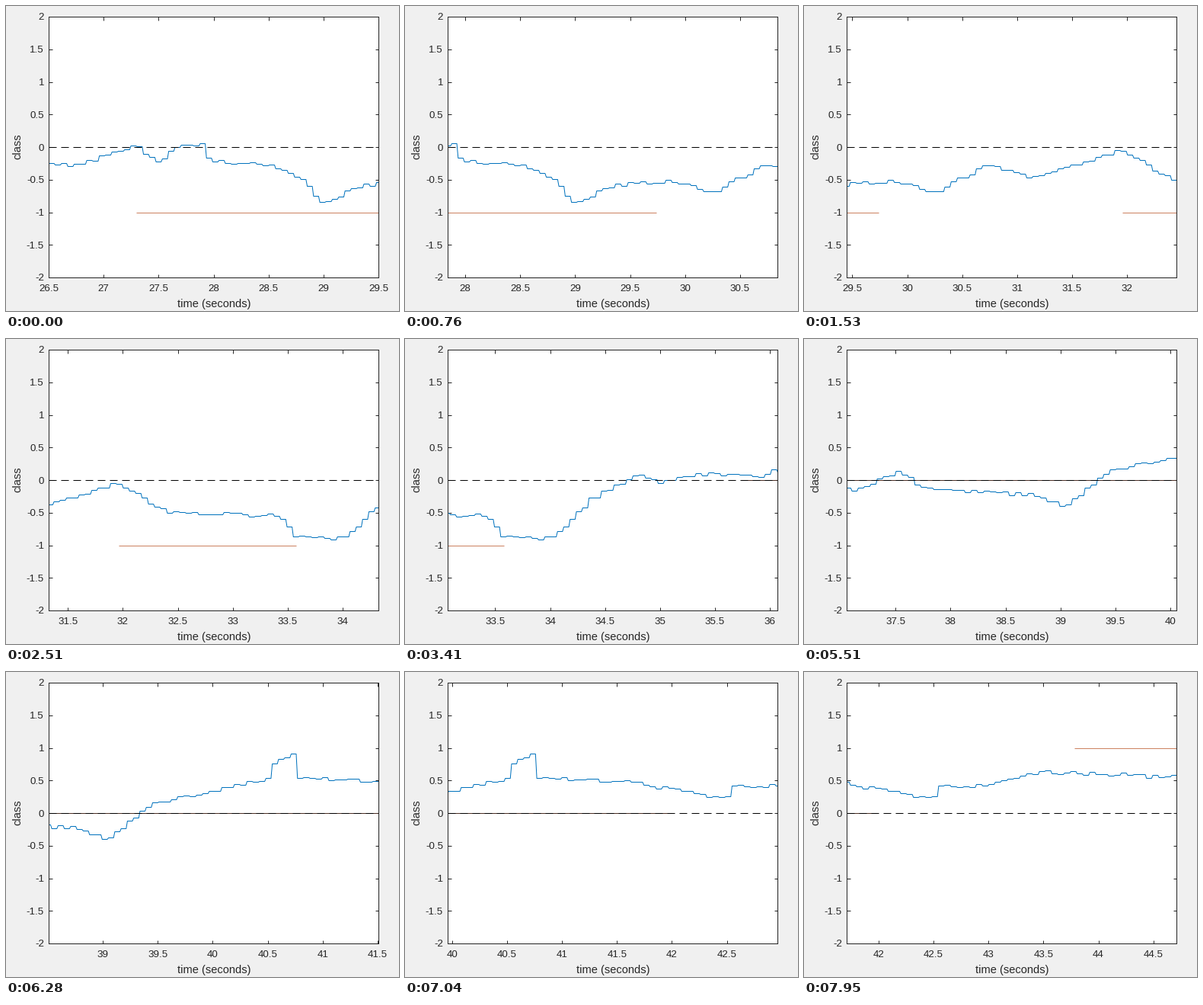
A matplotlib script that plays this animation: 516 by 400 pixels, repeating every 8 s.

```python
import numpy as np
import matplotlib.pyplot as plt
from matplotlib.animation import FuncAnimation
from matplotlib.ticker import MultipleLocator, FormatStrFormatter

W, H, DPI = 516, 400, 100
FRAMES, LOOP = 115, 8000
SPAN = 3.0                          # visible seconds
X0, X1, Y0, Y1 = 56, 489, 14, 356   # axes box in pixels from the top left
SEC = (X1 - X0) / SPAN              # pixels per second
UNIT = (Y1 - Y0) / 4                # pixels per class unit
STEP, RISE = 0.0573, 0.012          # hold time and edge time of one level
START, END = 26.5, 44.8
INK, BLUE, RUST, DARK = "#262626", "#0072BD", "#CC8160", "#4d3026"

# turning points of the signal: time, value
KEYS = [(26.5, -.29), (26.8, -.27), (27.3, .01), (27.5, -.26), (27.65, -.03),
        (27.92, .05), (27.97, -.23), (28.5, -.28), (28.8, -.47),
        (29.0, -.87), (29.4, -.58), (29.9, -.54), (30.26, -.71),
        (30.75, -.27), (31.15, -.48), (31.95, -.05), (32.42, -.5),
        (33.44, -.56), (33.57, -.87), (34.04, -.91), (34.38, -.3),
        (34.8, .06), (35.0, -.05), (35.4, .09), (35.95, .04), (36.05, .18),
        (36.5, -.5), (36.85, -.12), (37.14, -.16), (37.55, .13),
        (37.78, -.15), (38.8, -.24), (39.05, -.42), (39.46, .12),
        (40.5, .52), (40.6, .83), (40.74, .87), (40.79, .53), (41.55, .49),
        (42.5, .2), (42.58, .41), (43.0, .41), (43.5, .62), (44.8, .54)]

# class label: start, end, value
LABELS = [(27.295, 29.74, -1), (31.96, 33.58, -1),
          (35.76, 41.98, 0), (43.78, END, 1)]


def px(n):
    return n * 72 / DPI


def signal():
    """Sample and hold between the turning points, with a small wobble."""
    rng = np.random.default_rng(4)
    edges = np.arange(START, END + STEP, STEP)
    vals = np.interp(edges[:-1] + STEP / 2, *zip(*KEYS))
    vals += rng.uniform(-0.03, 0.03, len(vals))
    rows = (np.round(vals * UNIT) + 0.5) / UNIT     # centred on pixel rows
    t = np.column_stack([edges[:-1], edges[1:] - RISE]).ravel()
    return t + 0.5 / SEC, np.repeat(rows, 2)


def left_edge(k):
    return np.interp(k, [0, 62, 101, 114], [START, 34.81, 39.96, 41.71])


plt.rcParams["font.family"] = "Liberation Sans"
fig = plt.figure(figsize=(W / DPI, H / DPI), dpi=DPI, facecolor="#F0F0F0")
ax = fig.add_axes([X0 / W, 1 - Y1 / H, (X1 - X0) / W, (Y1 - Y0) / H])
ax.set_ylim(-2, 2)
for side in ax.spines.values():
    side.set(color=INK, linewidth=px(1))
for axis in (ax.xaxis, ax.yaxis):
    axis.set_major_locator(MultipleLocator(0.5))
    axis.set_major_formatter(FormatStrFormatter("%g"))
ax.tick_params(direction="in", top=True, right=True, length=px(4.5),
               width=px(1), color=INK, labelcolor=INK, labelsize=px(13.33))
ax.tick_params(axis="x", pad=px(9.5))
ax.tick_params(axis="y", pad=px(6))

ax.plot(*signal(), color=BLUE, lw=px(1), zorder=2)
for a, b, c in LABELS:
    ax.plot([a, b], [c, c], color=RUST if c else DARK, lw=px(1),
            solid_capstyle="butt", zorder=2.2)
ax.axhline(0, color="black", lw=px(1), dashes=(10, 6),
           dash_capstyle="butt", zorder=2.4)

label = dict(color=INK, fontsize=px(14.67), ha="center", va="baseline")
fig.text(273 / W, 1 - 394.5 / H, "time (seconds)", **label)
fig.text(19 / W, 1 - 184.5 / H, "class", rotation=90,
         rotation_mode="anchor", **label)


def draw(k):
    left = left_edge(k)
    ax.set_xlim(left, left + SPAN)
    return []


anim = FuncAnimation(fig, draw, frames=FRAMES, init_func=lambda: draw(0),
                     interval=LOOP / FRAMES, repeat=True, repeat_delay=0)
plt.show()
```
